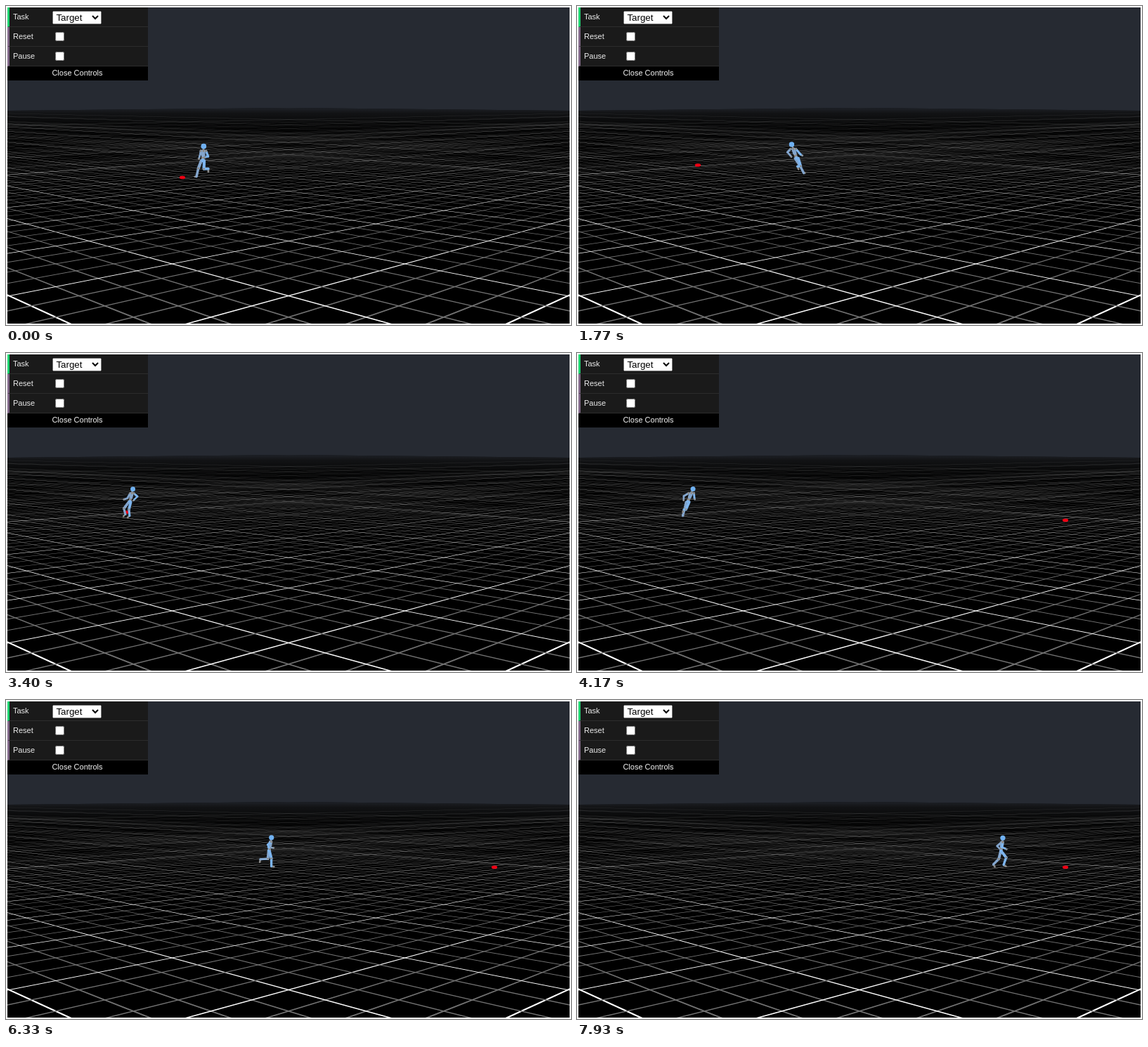
An HTML page with a canvas that plays this animation: 804x454 px, repeating every 8000 ms.

```html
<!DOCTYPE html>
<html lang="en">
<head>
<meta charset="utf-8">
<title>Runner on a grid</title>
<style>
  html, body { margin: 0; width: 100%; height: 100%; overflow: hidden; background: #fff; }
  canvas { position: absolute; left: 2px; top: 2px; }
  #panel { position: absolute; left: 2px; top: 2px; width: 200px; color: #eee;
    font: 11px/27px "Liberation Sans", Arial, sans-serif; text-shadow: 0 -1px 0 #111; }
  .row { position: relative; box-sizing: border-box; height: 28px; padding-left: 5px;
    background: #1a1a1a; border-left: 3px solid #806787; border-bottom: 1px solid #2c2c2c; }
  .row.choice { border-left-color: #1ed36f; }
  select { position: absolute; left: 61.4px; top: 5px; width: 70px; height: 19px; margin: 0; padding: 0;
    font: 13.333px "Liberation Sans", Arial, sans-serif; text-shadow: none; }
  input { position: absolute; left: 65.4px; top: 7px; width: 13px; height: 13px; margin: 0; }
  #close { height: 20px; line-height: 19px; background: #000; text-align: center; padding-right: 1px; box-sizing: border-box; }
</style>
</head>
<body>
<canvas id="floor" width="800" height="450"></canvas>
<canvas id="actors" width="800" height="450"></canvas>
<div id="panel">
  <div class="row choice">Task<select><option>Target</option></select></div>
  <div class="row">Reset<input type="checkbox"></div>
  <div class="row">Pause<input type="checkbox"></div>
  <div id="close">Close Controls</div>
</div>
<script>
const LOOP = 8, STEP = 0.3, HORIZON = 139.5, CENTER = 402, VANISH = 994;
const BLUE = '#7db5ef', DULL = '#83a5cd', GREY = '#8b8a88';

function context(id) {
  const c = document.getElementById(id).getContext('2d');
  c.translate(-2, -2);
  return c;
}

// Every floor line is a thin wedge starting at one of two vanishing points.
function drawFloor(c) {
  c.fillStyle = '#262a32';
  c.fillRect(0, 0, 804, 454);
  c.beginPath();
  [[0, 149], [CENTER, 145], [804, 149], [804, 454], [0, 454]].forEach(p => c.lineTo(...p));
  c.clip();
  c.fillStyle = '#000';
  c.fillRect(0, 140, 804, 314);

  const nearest = 0.002198, cell = 0.001465, reach = (VANISH + CENTER) / VANISH;
  for (let k = -1; k < 130; k++) {
    const h = 1 / (nearest + k * cell / 4);
    const isMajor = k % 4 === 0;
    if (!isMajor && h < 40) continue;
    const width = h * h * 1.3e-5 + h * 0.0018;
    c.globalAlpha = Math.min(1, h / 75);
    c.fillStyle = isMajor ? '#fff' : '#727272';
    for (const side of [-1, 1]) {
      const far = CENTER + side * CENTER;
      c.beginPath();
      c.moveTo(CENTER - side * VANISH, HORIZON);
      c.lineTo(far, HORIZON + (h - width / 2) * reach);
      c.lineTo(far, HORIZON + (h + width / 2) * reach);
      c.fill();
    }
  }
  c.globalAlpha = 1;
  const fog = c.createLinearGradient(0, 145, 0, 195);
  fog.addColorStop(0, 'rgba(38,42,50,.8)');
  fog.addColorStop(0.15, 'rgba(36,38,42,.5)');
  fog.addColorStop(0.45, 'rgba(36,38,40,.2)');
  fog.addColorStop(1, 'rgba(36,38,40,0)');
  c.fillStyle = fog;
  c.fillRect(0, 140, 804, 60);
}

// Smooth ramp: 0 after `end`, rising with slope 1 before it.
const rampBefore = (t, end, soft) => soft * Math.log(1 + Math.exp((end - t) / soft));
const bump = (t, middle, width) => Math.exp(-(((t - middle) / width) ** 2));

// The runner turns around at about 0.6, 1.7 and 4 seconds.
const hipX = t => 156 + 180.5 * Math.log(Math.cosh((t - 4) / 1.24))
  - 225 * rampBefore(t, 1.95, 0.15) + 130 * rampBefore(t, 0.79, 0.3);
const hipY = t => 214.5 + 11 * bump(t, 0.75, 0.9) - 3.5 * bump(t, 3.4, 1.2);

// Leg angles in degrees over two steps: stance, push-off, fold, swing.
const THIGH = [18, -14, -18, -3, 39, 38], SHIN = [3, -45, -80, -87, -20, 12];

function cycle(list, phase) {
  const n = list.length, f = ((phase / 2 % 1 + 1) % 1) * n, i = Math.floor(f), u = f - i;
  const at = k => list[(i + k + n) % n];
  const a = at(0), d = at(1) - a, s = (at(1) - at(-1)) / 2, e = (at(2) - a) / 2;
  return a + u * (s + u * (3 * d - 2 * s - e + u * (s + e - 2 * d)));
}

function drawRunner(c, t) {
  const x = hipX(t), y = hipY(t), dt = 0.01;
  const speed = (hipX(t + dt) - hipX(t - dt)) / (2 * dt);
  const push = (hipX(t + dt) - 2 * x + hipX(t - dt)) / (dt * dt);
  const face = Math.tanh(speed / 70);
  const front = Math.sqrt(1 - face * face);
  const tilt = 0.42 * Math.tanh(push / 85);
  const phase = (t - 5.13) / STEP;
  const size = (y - 139) / 75;
  const bob = 0.6 * Math.sin(phase * 2 * Math.PI);

  // Body space: forward, up from the hip, sideways.
  const place = ([f, up, side]) =>
    [x + size * (f * face + side * front + up * tilt), y + bob - size * up];
  const swing = ([f, up, side], length, degrees, out = 0) => {
    const a = degrees * Math.PI / 180;
    return [f + length * Math.sin(a), up - length * Math.cos(a), side + out];
  };
  const bone = (a, b, width, color) => {
    c.strokeStyle = color;
    c.lineWidth = width * size;
    c.beginPath();
    c.moveTo(...place(a));
    c.lineTo(...place(b));
    c.stroke();
  };
  const ball = (p, radius, color) => {
    c.fillStyle = color;
    c.beginPath();
    c.arc(...place(p), radius * size, 0, 7);
    c.fill();
  };
  const leg = (side, color) => {
    const p = phase + (side < 0 ? 1 : 0);
    const shin = cycle(SHIN, p);
    const hip = [0, -0.5, side * 2.3];
    const knee = swing(hip, 11, cycle(THIGH, p));
    const ankle = swing(knee, 11, shin);
    bone(ankle, swing(ankle, 4, shin + 78), 2.6, GREY);
    bone(hip, knee, 3.9, color);
    bone(knee, ankle, 3.3, color);
    ball(knee, 1.4, GREY);
  };
  const arm = (side, color) => {
    const angle = -32 - side * 26 * Math.cos(phase * Math.PI);
    const shoulder = [1.6, 12.5, side * 4];
    const elbow = swing(shoulder, 7.5, angle, side * 4);
    const hand = swing(elbow, 7.5, angle + 88, -side);
    bone(shoulder, elbow, 3, color);
    bone(elbow, hand, 2.6, color);
    ball(shoulder, 1.6, GREY);
    ball(hand, 1.3, GREY);
  };

  c.lineCap = 'round';
  arm(-1, DULL);
  leg(-1, DULL);
  leg(1, BLUE);
  bone([0, 0, 0], [0.7, 6, 0], 4.2, GREY);
  bone([0.8, 7, 0], [1.7, 12, 0], 5.2, DULL);
  bone([1.7, 12, 0], [2.2, 16, 0], 2.4, GREY);
  ball([0, 0, 0], 2.4, BLUE);
  ball([2.5, 18.6, 0], 3.6, '#70b1f2');
  arm(1, BLUE);
}

function drawTarget(c, t) {
  const [x, y] = t < 0.5 ? [251, 244] : t < 3.45 ? [172, 226.5] : [695, 238];
  c.fillStyle = '#f00014';
  c.beginPath();
  c.ellipse(x, y, 4.2, 2.3, 0, 0, 7);
  c.fill();
}

drawFloor(context('floor'));
const actors = context('actors');

function frame() {
  const t = performance.now() / 1000 % LOOP;
  actors.clearRect(0, 0, 804, 454);
  drawTarget(actors, t);
  drawRunner(actors, t);
  requestAnimationFrame(frame);
}
frame();
</script>
</body>
</html>
```
